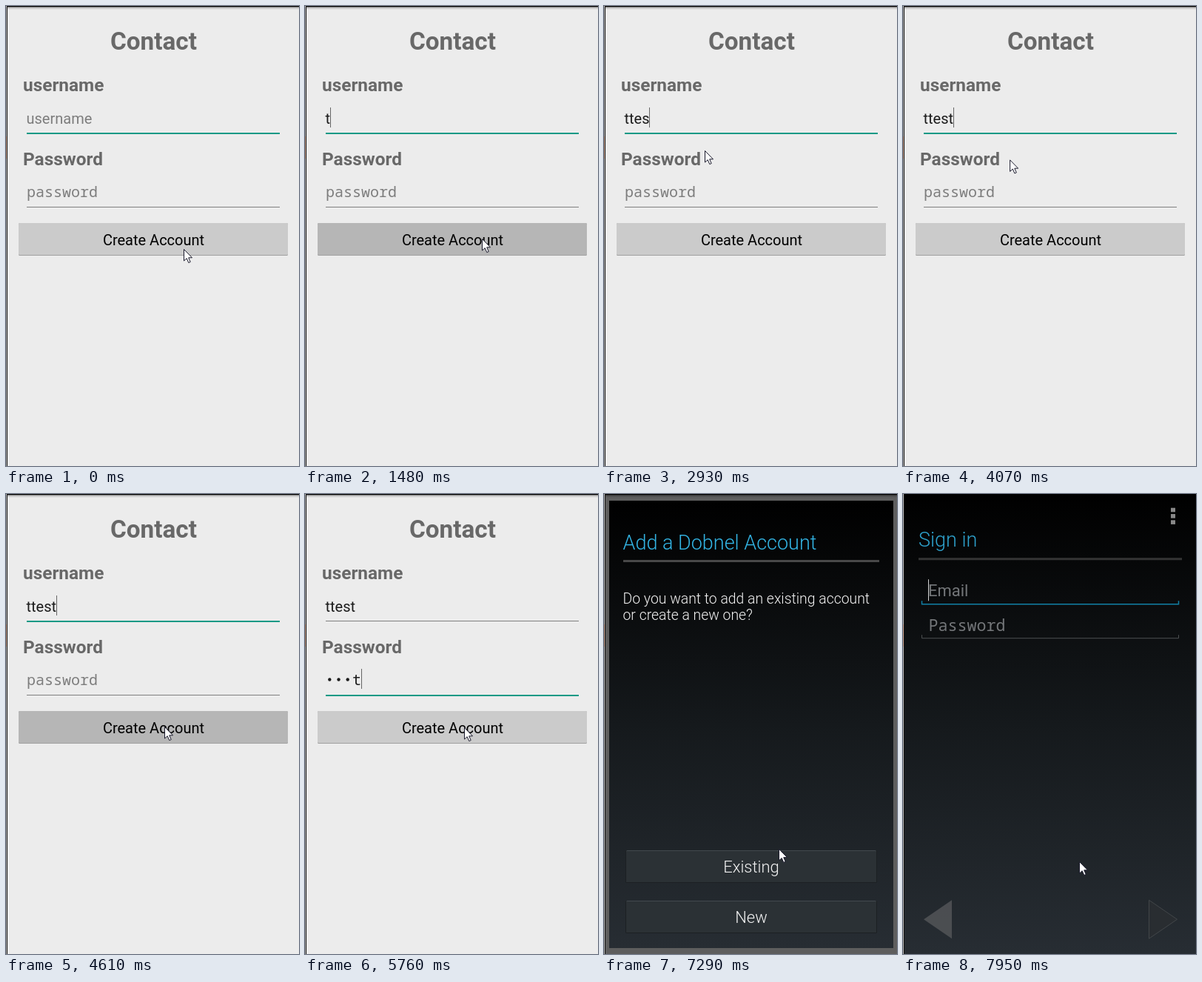
An HTML page that plays this animation: 396x621 px, repeating every 8000 ms.

```html
<!DOCTYPE html>
<html lang="en">
<head>
<meta charset="utf-8">
<title>Account form</title>
<style>
  html, body { margin: 0; width: 100%; height: 100%; overflow: hidden; background: #ececec; }
  svg { display: block; width: 396px; height: 621px; font-family: Roboto, sans-serif; }
  .label { font-weight: 700; fill: #686868; font-size: 24.4px; }
  .hint { fill: #7d7d7d; }
  .field { font-size: 20px; }
  .ink { fill: #1c1c1c; }
  .mono { font-family: "Noto Sans Mono", monospace; }
  .title { font-weight: 300; font-size: 27px; fill: #33b5e5; }
  .body { font-weight: 300; font-size: 19.4px; fill: #f3f3f3; }
  .choice { font-weight: 300; font-size: 22px; fill: #f3f3f3; text-anchor: middle; }
  .dim { fill: #808386; }
</style>
</head>
<body>
<svg viewBox="0 0 396 621" xmlns="http://www.w3.org/2000/svg">
  <defs>
    <linearGradient id="night" x1="0" y1="0" x2="0" y2="1">
      <stop offset="0" stop-color="#000"/>
      <stop offset=".5" stop-color="#15191c"/>
      <stop offset="1" stop-color="#272d33"/>
    </linearGradient>
    <linearGradient id="topShade" x1="0" y1="0" x2="0" y2="1">
      <stop offset="0" stop-color="#555"/>
      <stop offset=".3" stop-color="#bdbdbd"/>
      <stop offset="1" stop-color="#ececec"/>
    </linearGradient>
  </defs>

  <g id="form">
    <rect width="396" height="621" fill="#ececec"/>
    <rect y="1" width="396" height="4" fill="url(#topShade)"/>
    <text x="199.5" y="58.5" text-anchor="middle" class="label" style="font-size:33.3px">Contact</text>
    <text x="23" y="115" class="label">username</text>
    <text x="23" y="215" class="label">Password</text>
    <text id="userHint" x="27.5" y="159" class="field hint">username</text>
    <text id="user" x="27.5" y="159" class="field ink"></text>
    <rect id="userLine" x="28" y="171" width="342"/>
    <text id="passHint" x="28" y="258" class="field hint mono">password</text>
    <g id="dots" fill="#1c1c1c"></g>
    <text id="pass" y="258" class="field ink mono"></text>
    <rect id="passLine" x="28" y="271" width="342"/>
    <rect id="caret" width="1" height="27" fill="#666"/>
    <rect x="17" y="293" width="364" height="44" rx="1.5" fill="#a0a0a0"/>
    <rect id="button" x="17" y="293" width="364" height="43" rx="1.5"/>
    <text x="199.5" y="322.5" text-anchor="middle" class="field" fill="#000">Create Account</text>
  </g>

  <rect id="shade" width="396" height="621" fill="#000"/>

  <g id="dialog">
    <rect x="7" y="9" width="384" height="604" fill="url(#night)"/>
    <text x="25.5" y="75" class="title">Add a Dobnel Account</text>
    <rect x="26" y="89" width="346" height="3" fill="#484848"/>
    <text x="25.5" y="148" class="body">Do you want to add an existing account</text>
    <text x="25.5" y="170" class="body">or create a new one?</text>
    <g id="choices"></g>
  </g>

  <g id="signin">
    <rect width="396" height="621" fill="url(#night)"/>
    <g id="content">
      <g id="menu" fill="#999"></g>
      <text x="21" y="69" class="title">Sign in</text>
      <rect x="21" y="84" width="356" height="3" fill="#3a3a3a"/>
      <text x="34" y="136" font-size="22" class="dim">Email</text>
      <rect x="34" y="113" width="1" height="29" fill="#eee"/>
      <path d="M25.5 142V146.5H372.5V142" fill="none" stroke="#128fb9" stroke-width="1.5"/>
      <text x="34.5" y="182.5" font-size="21.7" class="dim mono">Password</text>
      <path d="M25.5 188V192.5H372.5V188" fill="none" stroke="#55585a"/>
      <path d="M28 572L66 546V598Z" fill="#505356"/>
      <path d="M332.5 546L370.5 572L332.5 598Z" fill="#2a2e32" stroke="#464a4d"/>
    </g>
  </g>

  <rect width="396" height="1" fill="#000"/>
  <rect width="1" height="621" fill="#b4b4b4"/>
  <rect y="176" width="1" height="30" fill="#c8a08c"/>
  <rect x="1" width="1" height="621" fill="#111"/>
  <path id="cursor" d="M.5 .5V16L4.2 12.7L6.8 18.6L9.2 17.5L6.7 11.8H11.5Z"
        fill="#fff" stroke="#1a1a2c" stroke-linejoin="round"/>
</svg>

<script>
const LOOP = 8000;
const TICK = 135;         // the screen refreshes in coarse ticks
const REFOCUS = 2140;     // the caret stops blinking
const TO_PASSWORD = 5000;
const DIALOG = 6630;
const PAGE = 7440;
const CONTENT = 7710;

// Pointer moves: start time, number of ticks, where it ends.
const moves = [
  { t: 140, n: 3, x: 239, y: 314 },
  { t: 1760, n: 6, x: 371, y: 155 },
  { t: 2670, n: 2, x: 368, y: 190 },
  { t: 2930, n: 1, x: 136, y: 195 },
  { t: 4070, n: 5, x: 214, y: 314 },
  { t: 4730, n: 3, x: 371, y: 245 },
  { t: 5310, n: 4, x: 215, y: 315 },
  { t: DIALOG, n: 1, x: 219, y: 331 },
  { t: 6780, n: 5, x: 238, y: 496 }
];
const keyTimes = [280, 2670, 2810, 2930, 3490];
const presses = [1480, 4610];

const $ = id => document.getElementById(id);
const set = (id, attrs) => {
  for (const k in attrs) $(id).setAttribute(k, attrs[k]);
};
const show = (id, on) => set(id, { visibility: on ? "visible" : "hidden" });
const smooth = k => k * k * (3 - 2 * k);

// Share of n ticks done; the first one falls on the start itself.
const progress = (t, start, n) =>
  t < start ? 0 : Math.min(1, (1 + Math.floor((t - start) / TICK)) / n);

function pointerAt(t) {
  let x = 240, y = 328;
  for (const m of moves) {
    const k = smooth(progress(t, m.t, m.n));
    x += (m.x - x) * k;
    y += (m.y - y) * k;
  }
  return [x, y];
}

function buttonShade(t) {
  for (const p of presses) {
    if (t >= p && t < p + TICK) return "#b6b6b6";
    if (t >= p - TICK && t < p) return "#c1c1c1";
  }
  return "#cbcbcb";
}

const underline = (id, on) =>
  set(id, on ? { height: 2, fill: "#0f9985" } : { height: 1, fill: "#808080" });

$("choices").innerHTML = ["Existing", "New"].map((name, i) => {
  const y = 481 + 68 * i;
  return `<rect x="29" y="${y}" width="340" height="44" rx="1.5" fill="#1c2023"/>
    <rect x="30" y="${y}" width="338" height="43" rx="1.5" fill="#42494e"/>
    <rect x="30" y="${y + 1}" width="338" height="42" rx="1" fill="#2b3135"/>
    <text x="199" y="${y + 30}" class="choice">${name}</text>`;
}).join("");
for (let i = 0; i < 3; i++) {
  $("menu").innerHTML += `<rect x="362" y="${16.5 + 8.3 * i}" width="6" height="5.6"/>`;
  $("dots").innerHTML += `<circle cx="${33.3 + 12.2 * i}" cy="250.5" r="2.2"/>`;
}

function drawForm(t) {
  const typed = keyTimes.filter(k => t >= k).length;
  $("user").textContent = "ttest".slice(0, typed);
  show("userHint", !typed);

  // Only the newest letter of the password stays readable.
  const count = 4 * progress(t, 5310, 4);
  $("pass").textContent = count ? "test"[count - 1] : "";
  set("pass", { x: 16 + 12 * count });
  show("passHint", !count);
  [...$("dots").children].forEach((dot, i) => dot.setAttribute("opacity", i < count - 1 ? 1 : 0));

  const inPass = t >= TO_PASSWORD;
  underline("userLine", !inPass);
  underline("passLine", inPass);
  set("caret", inPass
    ? { x: 28 + 12 * count, y: 236 }
    : { x: Math.round(27 + $("user").getComputedTextLength()), y: 137 });
  show("caret", t >= REFOCUS || (t + 360) % 1000 >= 500);
  set("button", { fill: buttonShade(t) });
}

function draw(t) {
  const [x, y] = pointerAt(t);
  set("cursor", { transform: `translate(${x} ${y})` });
  drawForm(t);

  const opening = progress(t, DIALOG, 2);
  set("shade", { opacity: .47 * Math.min(1, 2 * opening) + .13 * (opening === 1) });
  set("dialog", { opacity: 1 - (1 - opening) ** 3 });

  const k = 1 - (1 - progress(t, CONTENT, 3)) ** 2;
  set("signin", { opacity: t >= PAGE ? 1 : 0 });
  set("content", { opacity: k, transform: `translate(0 ${20 * (1 - k)})` });
}

// The last refresh of the content must land before the loop ends.
const start = performance.now();
function tick() {
  draw((performance.now() - start) % LOOP);
  requestAnimationFrame(tick);
}
draw(0);
requestAnimationFrame(tick);
</script>
</body>
</html>
```
